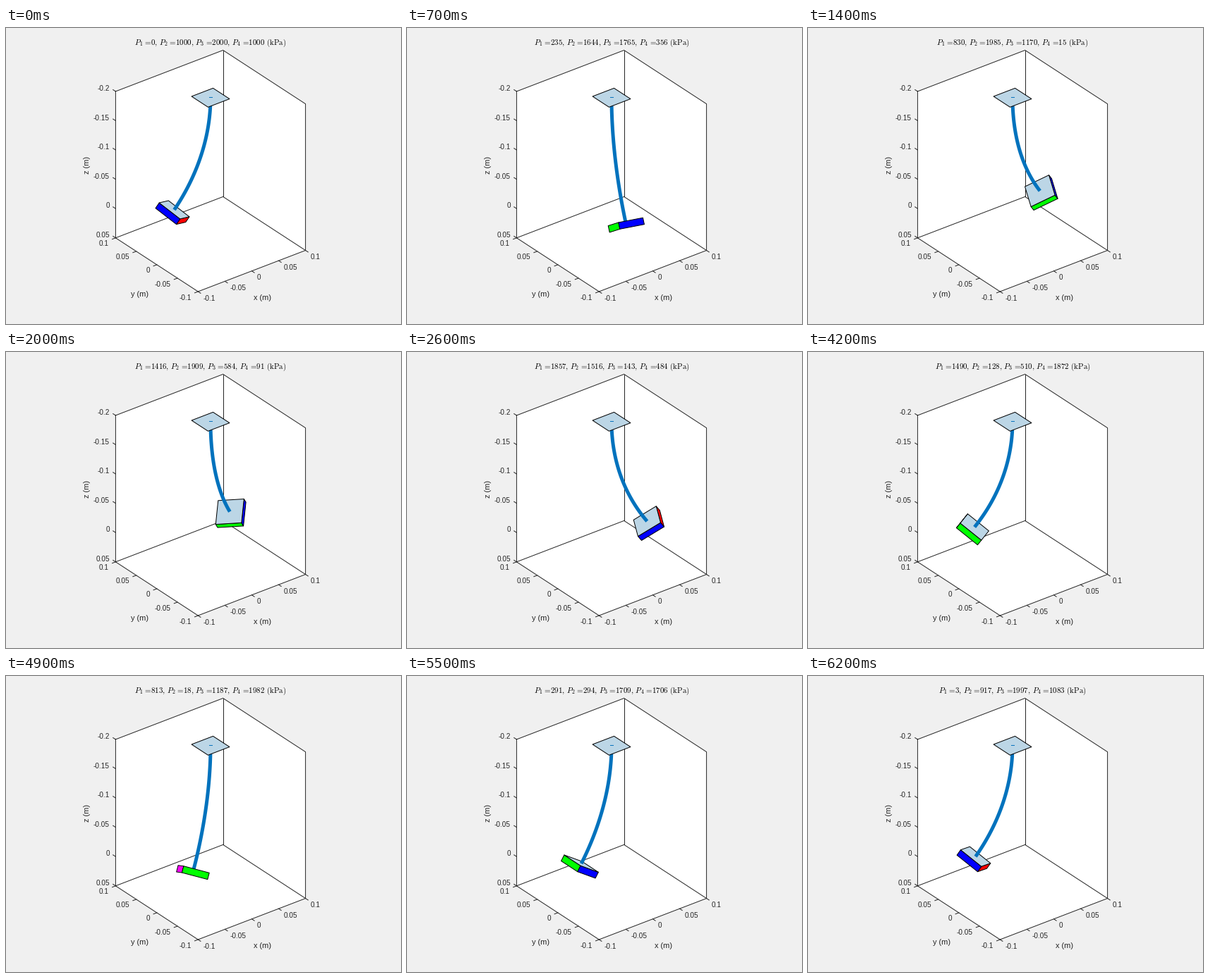
Recreate the animation shown at these times as a matplotlib script. Size 560 by 420 pixels, loop 6.3 s.

```python
import numpy as np
import matplotlib.pyplot as plt
from matplotlib.animation import FuncAnimation
from matplotlib.patches import Polygon, Rectangle

W, H, DPI = 560, 420, 100
FRAMES, STEP = 63, 0.1
PT = 72 / DPI  # one pixel in points

plt.rcParams["font.family"] = "Liberation Sans"
plt.rcParams["mathtext.fontset"] = "cm"

GRAY = "#262626"
PLATE = "#bcd6e6"
ARM = "#0072bd"

# Orthographic camera; z points down the screen
AZ, EL = np.radians(37.5), np.radians(30)
SCALE = 960
ORIGIN = np.array([290.0, 265.1])
CAMERA = np.array([
    [np.cos(AZ), -np.sin(AZ), 0],
    [-np.sin(EL) * np.sin(AZ), -np.sin(EL) * np.cos(AZ), np.cos(EL)],
])
TO_VIEWER = -np.array([np.cos(EL) * np.sin(AZ), np.cos(EL) * np.cos(AZ), np.sin(EL)])

LENGTH, BEND = 0.193, 0.6
BASE_Z = -0.2
HALF, THICK = 0.02, 0.01


def project(points):
    return ORIGIN + SCALE * np.asarray(points, float) @ CAMERA.T


def rot_z(a):
    c, s = np.cos(a), np.sin(a)
    return np.array([[c, -s, 0], [s, c, 0], [0, 0, 1]])


def rot_y(a):
    c, s = np.cos(a), np.sin(a)
    return np.array([[c, 0, s], [0, 1, 0], [-s, 0, c]])


fig = plt.figure(figsize=(W / DPI, H / DPI), dpi=DPI, facecolor="#f0f0f0")
ax = fig.add_axes([0, 0, 1, 1])
ax.set_xlim(0, W)
ax.set_ylim(H, 0)
ax.axis("off")


def segment(*points):
    xy = project(points)
    ax.plot(xy[:, 0], xy[:, 1], color=GRAY, lw=PT, zorder=2)


def label(x, y, text, size=10, **kw):
    return ax.text(x, y, text, fontsize=size * PT, color=GRAY, va="baseline", **kw)


def patch(color, zorder):
    shape = Polygon(np.zeros((4, 2)), closed=True, facecolor=color,
                    edgecolor="black", lw=PT, joinstyle="round", zorder=zorder)
    return ax.add_patch(shape)


def draw_axes():
    a, top, low = 0.1, -0.2, 0.05
    outline = [(-a, a, top), (a, a, top), (a, -a, top),
               (a, -a, low), (-a, -a, low), (-a, a, low)]
    ax.add_patch(Polygon(project(outline), facecolor="white", lw=0, zorder=1))
    segment(*outline, outline[0])
    for corner in [(a, a, top), (-a, a, low), (a, -a, low)]:
        segment((a, a, low), corner)

    def tick(point, direction, dx, dy, value, ha):
        point = np.array(point)
        segment(point, point + 0.00625 * np.array(direction))
        x, y = project(point)
        label(x + dx, y + dy + 3.6, f"{value:g}", ha=ha)

    for v in (-0.1, -0.05, 0, 0.05, 0.1):
        tick((v, -a, low), (0, -1, 0), 7.5, 9, v, "left")
        tick((-a, v, low), (-1, 0, 0), -9.5, 8, v, "right")
    for v in (-0.2, -0.15, -0.1, -0.05, 0, 0.05):
        tick((-a, a, v), (0, 1, 0), -8.5, -4.5, v, "right")

    label(363.5, 386.5, "x (m)", 11, ha="center")
    label(189.5, 381, "y (m)", 11, ha="center")
    label(118, 194.5, "z (m)", 11, ha="center", rotation=90, rotation_mode="anchor")


draw_axes()

SQUARE = [(-1, -1), (1, -1), (1, 1), (-1, 1)]
base = patch(PLATE, 8)
base.set_xy(project([(HALF * x, HALF * y, BASE_Z) for x, y in SQUARE]))
ax.add_patch(Rectangle((287.5, 98), 5, 1, facecolor=ARM, lw=0, zorder=9))

arm, = ax.plot([], [], color=ARM, lw=5 * PT, solid_capstyle="butt")
lid = patch(PLATE, 5)
# Side colours follow the edges of SQUARE: -y, +x, +y, -x
sides = [patch(c, 4) for c in ("#ff0000", "#ff00ff", "#00ff00", "#0000ff")]
title = ax.text(290, 24, "", fontsize=10.95 * PT, color="black",
                ha="center", va="baseline")


def title_text(t):
    c, s = np.cos(t), np.sin(t)
    pressures = [1000 * (1 + k) for k in (-c, s, c, -s)]
    terms = [rf"P_{i}\hspace{{0.117}}=\hspace{{-0.2}}{round(p)}"
             for i, p in enumerate(pressures, 1)]
    return "$" + r",\hspace{0.18}".join(terms) + r"\hspace{0.38}\mathrm{(kPa)}$"


def update(k):
    t = k * STEP
    title.set_text(title_text(t))

    # Bending direction plus a twist that swings twice per cycle
    bend_dir = t + np.radians(135)
    twist = np.radians(90 - 65 * np.cos(2 * t))
    turn = rot_z(twist + bend_dir)
    frame = turn @ rot_y(BEND) @ rot_z(-bend_dir)

    angle = np.linspace(0, BEND, 60)
    radius = LENGTH / BEND
    curve = np.column_stack([radius * (1 - np.cos(angle)), 0 * angle,
                             radius * np.sin(angle)]) @ turn.T
    curve[:, 2] += BASE_Z
    arm.set_data(*project(curve).T)

    def place(local):
        return project(curve[-1] + np.array(local) @ frame.T)

    upper = [(HALF * x, HALF * y, 0) for x, y in SQUARE]
    lower = [(x, y, THICK) for x, y, _ in upper]
    lid_seen = frame[:, 2] @ TO_VIEWER < 0
    lid.set_xy(place(upper))
    lid.set_visible(bool(lid_seen))
    arm.set_zorder(6 if lid_seen else 3)

    normals = [-frame[:, 1], frame[:, 0], frame[:, 1], -frame[:, 0]]
    for i, (side, normal) in enumerate(zip(sides, normals)):
        j = (i + 1) % 4
        side.set_xy(place([upper[i], upper[j], lower[j], lower[i]]))
        side.set_visible(bool(normal @ TO_VIEWER > 0))
    return [arm, lid, title, *sides]


anim = FuncAnimation(fig, update, frames=FRAMES, interval=100,
                     init_func=lambda: update(0), repeat=True, repeat_delay=0)
plt.show()
```
